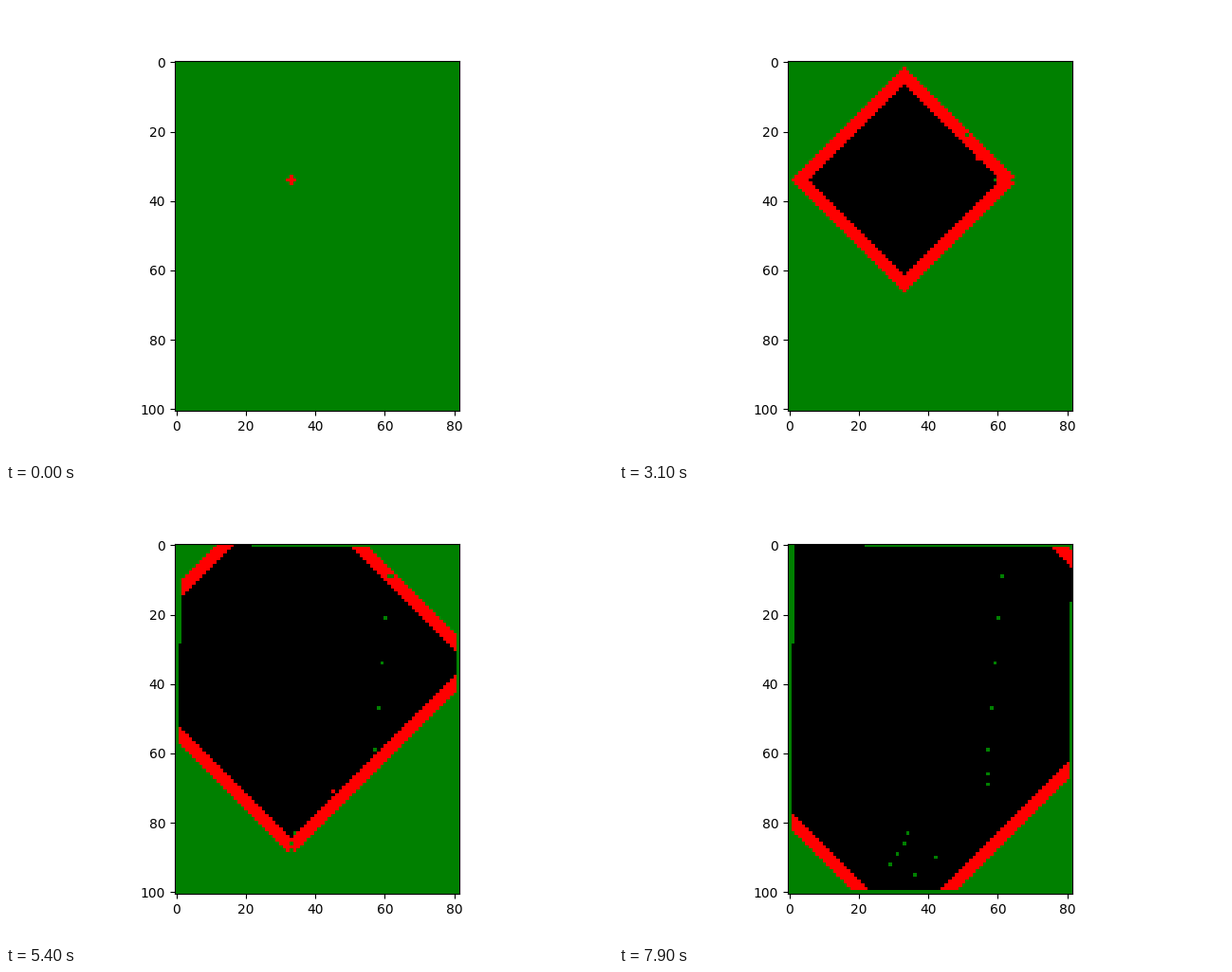
These frames come from a looping animation (640x480 px, 8000 ms). A matplotlib script:

```python
import matplotlib.pyplot as plt
import numpy as np
from matplotlib.animation import FuncAnimation
from matplotlib.colors import ListedColormap

ROWS, COLS = 101, 82
START = (34, 33)
BURN_TIME = 5
FRAMES = 80
LATE_SHARE = 0.004


def grid_index(rows, cols):
    return np.rint(rows).astype(int), np.rint(cols).astype(int)


def streak(first, last, count):
    """Evenly spaced cells between two points."""
    return grid_index(*np.linspace(first, last, count).T)


def damp_trail():
    """Cells on a slanted line, set closer together towards its lower end."""
    rows = START[0] + 35 * np.sin(np.arange(-2, 5) * np.pi / 8)
    return grid_index(rows, 61.5 - rows / 14)


def spread_cost():
    """Steps fire needs to enter each cell; infinite where nothing burns."""
    rng = np.random.default_rng(4)
    cost = np.ones((ROWS, COLS))

    # A few cells on the right half catch fire late
    right = cost[:, START[1] + 1:]
    late = rng.random(right.shape) < LATE_SHARE
    right[late] += rng.integers(1, 4, late.sum())

    for cells in (damp_trail(),
                  streak((83, 34.4), (92, 29), 4),
                  streak((90, 42), (100, 30), 3)):
        cost[cells] = np.inf

    # Damp borders
    cost[:, 0] = cost[-1] = np.inf
    cost[:29, 1] = np.inf
    cost[0, 22:] = np.inf
    cost[17:, -1] = np.inf
    return cost


def ignition_times():
    """Earliest step at which fire reaches each cell from its four neighbours."""
    cost = spread_cost()
    t = np.full((ROWS, COLS), np.inf)
    t[START] = 0
    for _ in range(ROWS + COLS):
        p = np.pad(t, 1, constant_values=np.inf)
        near = np.minimum.reduce(
            [p[:-2, 1:-1], p[2:, 1:-1], p[1:-1, :-2], p[1:-1, 2:]])
        t = np.minimum(t, near + cost)
    return t - 1


ignition = ignition_times()


def forest(n):
    age = n - ignition
    return (age >= 0).astype(int) + (age >= BURN_TIME)


fig, ax = plt.subplots(figsize=(6.4, 4.8), dpi=100)
image = ax.imshow(forest(0), cmap=ListedColormap(["green", "red", "black"]),
                  vmin=0, vmax=2, interpolation="nearest")


def update(n):
    image.set_data(forest(n))
    return [image]


anim = FuncAnimation(fig, update, frames=FRAMES, interval=100,
                     repeat=True, repeat_delay=0)
plt.show()
```
